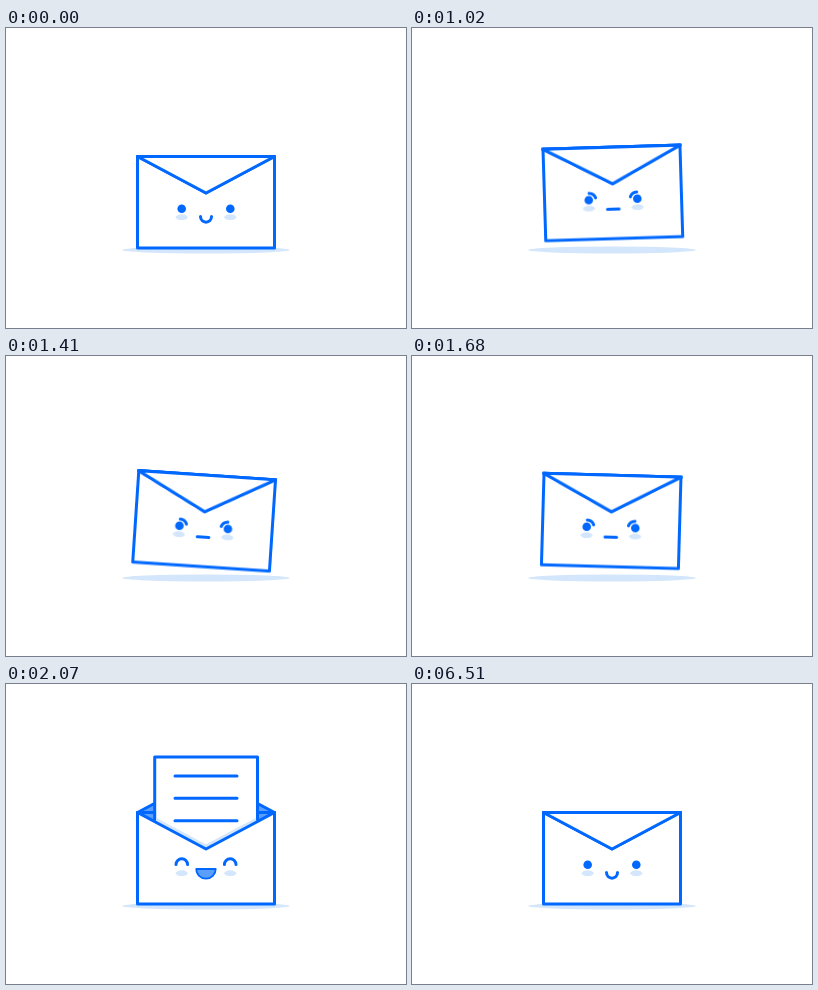
Recreate the animation shown at these times as an HTML page. Size 400 by 300 pixels, loop 7.17 s.

```html
<!DOCTYPE html>
<html lang="en">
<head>
<meta charset="utf-8">
<title>Happy envelope</title>
<style>
  :root { --blue: #0068ff; --mid: #5c9efb; --pale: #d3e6fb; }
  html, body { margin: 0; width: 100%; height: 100%; overflow: hidden; background: #fff; }
  svg { display: block; width: 100vw; height: 100vh; }

  .line { fill: none; stroke: var(--blue); stroke-width: 3; stroke-linecap: round; stroke-linejoin: round; }
  .paper { fill: #fff; }
  .inside { fill: var(--mid); }
  .pale { fill: var(--pale); }
  .dot { fill: var(--blue); }

  .lift, .shake, .flap, .cover, .letter, .blur, .shade, .plain, .happy, .mouth, .brows {
    animation: 7170ms linear infinite;
  }
  .lift { animation-name: lift; }
  .shake { animation-name: shake; transform-origin: 200px 146px; animation-timing-function: cubic-bezier(.37, 0, .63, 1); }
  .flap { animation-name: flap; transform-origin: 200px 128.5px; }
  .cover { animation-name: cover; animation-timing-function: step-end; }
  .letter { animation-name: letter; }
  .blur { animation-name: blur; animation-timing-function: step-end; }
  .shade { animation-name: shade; animation-timing-function: step-end; }
  .plain { animation-name: plain; animation-timing-function: step-end; }
  .happy { animation-name: happy; animation-timing-function: step-end; }
  .mouth { animation-name: mouth; }
  .brows { animation-name: brows; }

  @keyframes lift {
    0%, 7.322% { transform: translateY(0); animation-timing-function: ease-out; }
    9.205% { transform: translateY(-9.3px); }
    26.848% { transform: translateY(-9.3px); animation-timing-function: ease-in; }
    27.6%, 100% { transform: translateY(0); }
  }
  @keyframes shake {
    0%, 8.368% { transform: rotate(0); }
    9.972%, 13.194%, 16.416%, 19.637%, 22.859%, 26.081% { transform: rotate(3.82deg); }
    11.583%, 14.805%, 18.026%, 21.248%, 24.47% { transform: rotate(-3.82deg); }
    27.057%, 100% { transform: rotate(0); }
  }
  @keyframes flap {
    0%, 26.709% { transform: scaleY(1); }
    27.336%, 89.261% { transform: scaleY(-1); }
    90.656%, 100% { transform: scaleY(1); }
  }
  @keyframes cover {
    0% { visibility: visible; }
    27.022% { visibility: hidden; }
    89.958%, 100% { visibility: visible; }
  }
  @keyframes letter {
    0%, 26.918% { transform: translateY(62px); }
    27.197% { transform: translateY(25px); }
    27.615% { transform: translateY(1px); }
    28.033% { transform: translateY(-5px); }
    28.452% { transform: translateY(-2px); }
    28.842%, 87.015% { transform: translateY(0); }
    87.028% { transform: translateY(1.2px); }
    87.448% { transform: translateY(5px); animation-timing-function: cubic-bezier(.35, .2, .75, .8); }
    89.261%, 100% { transform: translateY(62px); }
  }
  @keyframes blur {
    0% { filter: none; }
    26.95% { filter: url(#smear); }
    28.6% { filter: none; }
    87.02% { filter: url(#smear); }
    89.261%, 100% { filter: none; }
  }
  @keyframes shade {
    0% { visibility: hidden; }
    27.685% { visibility: visible; }
    87.87%, 100% { visibility: hidden; }
  }
  @keyframes plain {
    0% { visibility: visible; }
    27.127% { visibility: hidden; }
    89.121%, 100% { visibility: visible; }
  }
  @keyframes happy {
    0% { visibility: hidden; }
    27.127% { visibility: visible; }
    89.121%, 100% { visibility: hidden; }
  }
  @keyframes mouth {
    0%, 7.322% { d: path("M194.5 188.5C194.5 196 205.5 196 205.5 188.5"); }
    9.205%, 27.5% { d: path("M194.2 190.6C197 190.6 203 190.6 205.8 190.6"); }
    28%, 100% { d: path("M194.5 188.5C194.5 196 205.5 196 205.5 188.5"); }
  }
  @keyframes brows {
    0%, 7.322% { opacity: 0; }
    9.205%, 27.5% { opacity: 1; }
    28%, 100% { opacity: 0; }
  }
</style>
</head>
<body>
<svg viewBox="0 0 400 300">
  <defs>
    <filter id="smear" x="-10%" y="-10%" width="120%" height="120%" color-interpolation-filters="sRGB">
      <feGaussianBlur stdDeviation="0 1"/>
    </filter>
    <clipPath id="pocket"><rect x="120" y="0" width="160" height="200"/></clipPath>
    <path id="fold" d="M131.5 128.5H268.5L200 165Z"/>
  </defs>

  <ellipse class="pale" cx="200" cy="222" rx="84" ry="3.5"/>

  <g class="lift"><g class="shake">
    <use href="#fold" class="line inside"/>
    <g class="flap"><use href="#fold" class="line inside"/></g>

    <g clip-path="url(#pocket)">
      <g class="letter"><g class="blur">
        <rect class="line paper" x="148.7" y="73" width="102.8" height="110"/>
        <path class="line" d="M169 92H231M169 114.3H231M169 136.8H231"/>
      </g></g>
    </g>
    <path class="shade" d="M150.2 135.5L200 162L250 135.5" fill="none" stroke="var(--pale)" stroke-width="3"/>

    <path class="line paper" d="M131.5 128.5L200 165L268.5 128.5V220H131.5Z"/>
    <g class="cover"><g class="flap"><use href="#fold" class="line paper"/></g></g>

    <ellipse class="pale" cx="175.7" cy="189.2" rx="6" ry="2.9"/>
    <ellipse class="pale" cx="224.3" cy="189.2" rx="6" ry="2.9"/>

    <g class="plain">
      <circle class="dot" cx="175.7" cy="180.8" r="4.3"/>
      <circle class="dot" cx="224.3" cy="180.8" r="4.3"/>
      <path class="line mouth" d="M194.5 188.5C194.5 196 205.5 196 205.5 188.5"/>
      <path class="line brows" stroke-width="2.8" d="M176.2 174A7.2 7.2 0 0 1 182.6 178.6M223.8 174A7.2 7.2 0 0 0 217.4 178.6"/>
    </g>
    <g class="happy">
      <path class="line" d="M170 180.6A5.8 5.8 0 0 1 181.6 180.6M218.4 180.6A5.8 5.8 0 0 1 230 180.6"/>
      <path class="line inside" style="fill:var(--mid);stroke-width:1.8" d="M190.3 185H209.7A9.7 9.7 0 0 1 190.3 185Z"/>
    </g>
  </g></g>
</svg>
<script>
  // .line clears fills, so restore them for closed shapes
  document.querySelectorAll('.line.inside').forEach(el => el.style.fill = 'var(--mid)');
  document.querySelectorAll('.line.paper').forEach(el => el.style.fill = '#fff');
</script>
</body>
</html>
```
